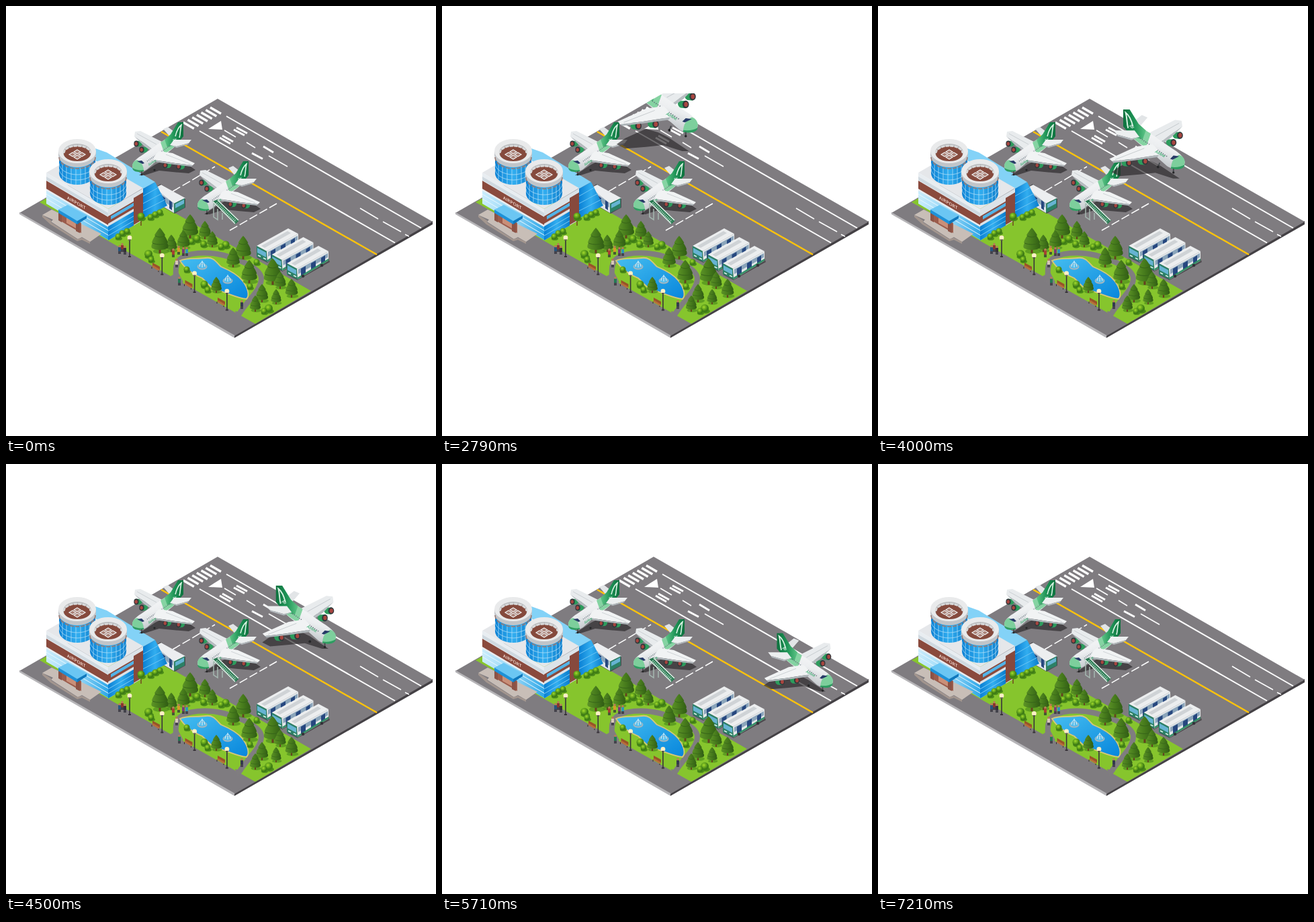
Recreate the animation shown at these times as an HTML page. Size 640 by 640 pixels, loop 9640 ms.

```html
<!DOCTYPE html>
<html lang="en">
<head>
<meta charset="utf-8">
<title>Isometric airport</title>
<style>
html, body { margin: 0; width: 100%; height: 100%; overflow: hidden; background: #fff; }
svg { display: block; width: 100%; height: 100%; }
.sign { font: 600 6.5px "Open Sans", Roboto, sans-serif; fill: #f3dcd3; }
.mark { fill: none; stroke: #fff; stroke-width: 2; }
.logo { font: italic 600 5px Lato, sans-serif; fill: #2fa866; }
.logo.light { fill: #fff; }
</style>
</head>
<body>
<svg viewBox="0 0 640 640">
<defs>
  <linearGradient id="water" x2="1" y2="1"><stop stop-color="#45bdf0"/><stop offset="1" stop-color="#0786dc"/></linearGradient>
  <linearGradient id="glass"><stop stop-color="#c9ecfc"/><stop offset=".55" stop-color="#8fd4f6"/><stop offset="1" stop-color="#2ea7e8"/></linearGradient>
  <linearGradient id="blue"><stop stop-color="#0a80d4"/><stop offset=".5" stop-color="#32aef0"/><stop offset="1" stop-color="#0a7ccc"/></linearGradient>
  <linearGradient id="hull" x2=".5" y2="1"><stop stop-color="#fff"/><stop offset=".55" stop-color="#eceef0"/><stop offset="1" stop-color="#b9bfc3"/></linearGradient>
  <linearGradient id="fin"><stop stop-color="#5fc487"/><stop offset=".5" stop-color="#1f9557"/><stop offset="1" stop-color="#0d713e"/></linearGradient>
  <linearGradient id="leaf"><stop stop-color="#5d9426"/><stop offset=".5" stop-color="#467a1c"/><stop offset="1" stop-color="#305c14"/></linearGradient>
  <radialGradient id="bushFill" cx=".4" cy=".35"><stop stop-color="#a5d92e"/><stop offset=".45" stop-color="#6fb01f"/><stop offset="1" stop-color="#3d7a15"/></radialGradient>
  <clipPath id="board"><path d="M315 138 635 321 340 491 20 308Z"/></clipPath>
  <clipPath id="airspace"><path d="M329 130H640V318L340 491 20 308Z"/></clipPath>

  <path id="shade" d="M10 12 34-4 46-10 60-14 84-3 94 4 84 9 60 7 40 5 18 12Z" fill="#2b292c" opacity=".68"/>

  <g id="engine">
    <path d="M-1-4.200 7-4C10-3 10 2 6 4L0 4.600Z" fill="#2d9c5d"/>
    <ellipse rx="3.700" ry="4.400" fill="#30383c"/>
    <ellipse cx="-.3" rx="2.200" ry="2.800" fill="#a8453f"/>
  </g>
  <g id="plane">
    <path d="M46-57 53-60 66-50 58-43Z" fill="#e2e5e7"/>
    <use href="#engine" x="6" y="-35"/><use href="#engine" x="14" y="-26"/>
    <path d="M3-46 4-53 12-54 48-36 32-25 19-35Z" fill="#e8ebed"/>
    <path d="M3-46 19-35 32-25 30-23 17-32Z" fill="#b7bdc1"/>
    <path d="M7-50 36-34" stroke="#c3c8cc" fill="none" stroke-width=".8"/>
    <path d="M0-2C1-9 8-14 16-19L48-41 58-44 68-36C60-26 50-20 40-13L22 3C14 9 0 7 0-2Z" fill="url(#hull)"/>
    <path d="M42-37 50-42 60-44 68-36C60-27 54-24 48-20Z" fill="#85d3a2"/>
    <path d="M48-41 57-49 68-67H76L76-46 66-34 52-30Z" fill="url(#fin)"/>
    <path d="M64-46C66-54 69-60 73-63 71-56 72-51 70-44" stroke="#d9f3e3" stroke-width="1.600" fill="none"/>
    <path d="M62-41 88-41 84-36 66-31 56-33Z" fill="#eceff0"/>
    <path d="M56-33 66-31 84-36 83-34 66-29Z" fill="#b3b9bd"/>
    <path d="M0-3C1-8 4-10 7-11 13-8 17-3 17 6 9 8 0 6 0-3Z" fill="#7dcf9c"/>
    <path d="M0 1C5 4 11 5 17 4V6C9 8 1 7 0 1Z" fill="#2f9c61"/>
    <path d="M7-9 14-10 18-6 15-5Z" fill="#263a67"/>
    <path d="M22-9 56-32" stroke="#5d6874" stroke-width="1.300" stroke-dasharray="1 1.600" fill="none"/>
    <use href="#engine" x="49" y="-3"/><use href="#engine" x="69" y="-1"/>
    <path d="M40-24 60-21 93-6 90-3 64-6 32-11C32-17 36-21 40-24Z" fill="#f1f3f4"/>
    <path d="M32-11 64-6 90-3 88-1 62-4 34-8Z" fill="#afb6ba"/>
    <path d="M50-19 86-5" stroke="#c6cbce" stroke-width=".8" fill="none"/>
    <path d="M14 6V11M31-1 33 4" stroke="#45494d" stroke-width="1.600"/>
    <circle cx="14" cy="11" r="1.400" fill="#252527"/><circle cx="33" cy="4" r="1.600" fill="#252527"/>
  </g>

  <g id="bus">
    <path d="M0 43 16 51 64 24 60 15Z" fill="#4d4a4e"/>
    <path d="M0 26 47 0 62 8 15 34Z" fill="#eceeef"/>
    <path d="M7 26 46 4 51 7 12 29Z" fill="#cfd3d6"/>
    <path d="M0 26 15 34 16 50 0 42Z" fill="#2c8065"/>
    <path d="M1 29 14 36V43L1 36Z" fill="#66b3d2"/>
    <path d="M2 40 6 42M10 44 14 46" stroke="#d9f1e4" stroke-width="1.500"/>
    <path d="M15 34 62 8V22L16 50Z" fill="#e4e8ea"/>
    <path d="M17 35 61 11V17L17 42Z" fill="#8ba5bb"/>
    <path d="M21 34 28 30V41L21 45ZM36 26 43 22V33L36 37ZM51 18 57 14V25L51 28Z" fill="#26477f"/>
    <path d="M16 47 62 19V22L16 50Z" fill="#349067"/>
    <circle cx="24" cy="45" r="2.300" fill="#343238"/><circle cx="52" cy="29" r="2.300" fill="#343238"/>
  </g>

  <g id="tower">
    <path d="M-27 6V33A27 17 0 0 0 27 33V6Z" fill="url(#blue)"/>
    <g fill="none" stroke="#bfe6fa" stroke-width=".7">
      <path d="M-27 18A27 17 0 0 0 27 18M-27 26A27 17 0 0 0 27 26"/>
      <path d="M-22 18V42M-16 22V46M-9 24V49M-2 25V50M5 25V50M12 23V48M18 21V45M23 17V41"/>
    </g>
    <path d="M-28 0V6A28 18 0 0 0 28 6V0Z" fill="#c1c5c9"/>
    <path d="M-27 9A27 17 0 0 0 27 9" fill="none" stroke="#9a7a73" stroke-width="1.600" stroke-dasharray="6 2"/>
    <ellipse rx="28" ry="18" fill="#e9eaeb"/>
    <ellipse cy="2" rx="21" ry="13" fill="#b9bbbd"/>
    <ellipse cy="4" rx="20" ry="11" fill="#854a3d"/>
    <path d="M-20 3A20 11 0 0 1 20 3" fill="none" stroke="#d9dadb" stroke-width="3" stroke-dasharray="5 1.500"/>
    <path d="M0-2 5 1 0 4-5 1ZM0 6 5 9 0 12-5 9ZM-7 2-2 5-7 8-12 5ZM7 2 12 5 7 8 2 5Z" fill="#a98177" stroke="#eee" stroke-width="1.200"/>
  </g>

  <g id="tree">
    <ellipse cx="2" cy="-3" rx="12" ry="4" fill="#4e8e1d" opacity=".7"/>
    <path d="M-1.500-9H1.500V0H-1.500Z" fill="#65421f"/>
    <path d="M0-38C4-34 6-30 8-27L7-26C9-23 11-20 12-16L11-15C13-12 13-9 12-8 8-4-8-4-12-8-13-9-13-12-11-15L-12-16C-11-20-9-23-7-26L-8-27C-6-30-4-34 0-38Z" fill="url(#leaf)"/>
    <path d="M-7-26Q0-22 7-26M-11-15Q0-11 11-15" fill="none" stroke="#37641a" stroke-width="1"/>
  </g>
  <g id="bush"><ellipse cx=".2" cy=".7" rx="1.100" ry=".6" fill="#4b8a19"/><circle r="1" fill="url(#bushFill)"/></g>
  <g id="lamp">
    <path d="M0 2V28" stroke="#38333a" stroke-width="1.600"/><path d="M-2 28H2" stroke="#38333a" stroke-width="2"/>
    <circle r="3.400" fill="#fff0c6"/><path d="M-2 3H2" stroke="#4a4248" stroke-width="1.200"/>
  </g>
  <g id="bench">
    <path d="M-4-5 7 1V6L-4 0Z" fill="#985328"/><path d="M-5 1-3-1 7 5 5 7Z" fill="#b86d3a"/>
    <path d="M-5 1V4M5 7V9" stroke="#3d302a"/>
  </g>
  <g id="fountain">
    <ellipse cy="2" rx="7.500" ry="4.500" fill="#a8b6bd"/><ellipse cy="1.500" rx="6" ry="3.200" fill="#55bdec"/>
    <path d="M-4 2Q-3-5 0-5 3-5 4 2M0-7V3" fill="none" stroke="#e3f5fd"/>
  </g>
</defs>

<path d="M20 307 340 490V494L20 310Z" fill="#b6b5b8"/>
<path d="M340 490 635 320V325L340 494Z" fill="#444145"/>
<path d="M315 138 635 321 340 491 20 308Z" fill="#7f7c80"/>
<path d="M20 308 340 491" stroke="#b6b5b8" stroke-width="2"/>

<g class="mark">
  <path d="M328 164 618 330.500M288 186 579 352.500"/>
  <path d="M325 185 342 195M358 203 371 211M391 223 419 239M527 301 554 317M561 321 588 336M594 340 600 343" stroke-width="1.600"/>
  <path d="M339 184 355 192.500M343 181 359 189.500M318 196 334 205M322 193 338 202M366 219 382 227.500M383 209 398 218" stroke-width="3"/>
  <path d="M248 276 311 239M333 334 403 294" stroke-width="1.500" stroke-dasharray="13 4"/>
  <g id="threshold" stroke-width="3.500"/>
</g>
<path d="M301 183 320 171 322 184Z" fill="#fff"/>
<path d="M231 187 552 370" stroke="#fdc30b" stroke-width="2.400"/>

<path d="M50 292 64 284 232 297 454 424 371 473Z" fill="#86c52d"/>
<path d="M250 411C256 402 249 390 257 379 268 366 300 365 324 371 350 378 380 391 380 406 379 424 360 437 346 460" fill="none" stroke="#807d80" stroke-width="8"/>
<path d="M245 402 256 396 264 411 254 415ZM341 454 353 457 344 464Z" fill="#807d80"/>
<path d="M259 379C270 374 284 377 297 375 310 373 314 383 320 388 332 393 345 400 352 409 360 419 363 431 358 436 345 435 332 428 318 424 305 421 300 412 292 405 280 400 267 392 259 379Z" fill="url(#water)" stroke="#d7c878" stroke-width="1.800"/>
<use href="#fountain" x="292" y="386"/><use href="#fountain" x="330" y="407"/>

<!-- shuttle behind the terminal -->
<g transform="translate(-1 1)">
  <path d="M222 270 231 264 268 286V299L252 308 222 291Z" fill="#4b494d"/>
  <path d="M222 270 232 265 268 285 251 293Z" fill="#eceef0"/>
  <path d="M222 270 251 293V307L222 290Z" fill="#dfe5ea"/>
  <path d="M226 275 250 292V299L226 284Z" fill="#8ba5bb"/>
  <path d="M234 282 238 285V296L234 294ZM244 288 248 291V303L244 300Z" fill="#27477e"/>
  <path d="M251 293 267 285V299L251 307Z" fill="#2c8065"/><path d="M253 294 266 287V293L253 300Z" fill="#66b3d2"/>
</g>

<!-- terminal -->
<path d="M133 212 150 218 222 262 204 272 114 219Z" fill="#83d2f7"/>
<path d="M204 272 222 262 240 297 204 316Z" fill="url(#blue)"/>
<path d="M204 283 227 270M204 294 232 279M204 305 237 288" stroke="#6cc4f3"/>
<path d="M60 248 112 218 204 271 152 302Z" fill="#e5e7ea"/>
<g transform="matrix(1 .587 0 1 60 248)">
  <path d="M0 0H92V46H0Z" fill="#e8edf1"/><path d="M0 6H92V11H0Z" fill="#cfd9e0"/>
  <path d="M0 12H92V24H0Z" fill="#8a4a3d"/>
  <path d="M0 27H92V46H0Z" fill="url(#glass)"/>
  <path d="M0 32H92M0 39H92" stroke="#e9f7fe" stroke-width="1.200"/>
  <text class="sign" x="31" y="21">AIRPORT</text>
</g>
<g transform="matrix(1 -.585 0 1 152 302)">
  <path d="M0 0H52V47H0Z" fill="#dce3e8"/>
  <path d="M0 11H38V22H0Z" fill="#8a4a3d"/><path d="M4 13H38V18H4Z" fill="#52b4e8"/>
  <path d="M0 26H38V47H0Z" fill="url(#blue)"/><path d="M0 33H38M0 40H38" stroke="#7bcaf4"/>
  <path d="M38 6H52V46H38Z" fill="#87493d"/>
</g>
<path d="M54 311 68 303 142 339 125 351 113 344 107 347 67 321 70 318Z" fill="#c8beb7"/>
<path d="M54 311 67 319 67 322 106 347 113 345 125 351V354L113 348 106 350 66 325 54 314Z" fill="#a3968f"/>
<path d="M83 307 112 323V338L83 321Z" fill="#9b5c4c"/><path d="M90 313 106 322V332L90 323Z" fill="#c98f78"/>
<path d="M78 306H83V322L78 319ZM104 320H110V338L104 335Z" fill="#8b5245"/>
<path d="M78 303 92 296 120 312 106 321Z" fill="#6bc6f3"/><path d="M78 303 106 320V325L78 308Z" fill="#1d91d8"/><path d="M106 320 120 312V316L106 325Z" fill="#0f78bd"/>
<use href="#tower" x="106" y="216"/><use href="#tower" x="152" y="246"/>

<g id="parked"></g>
<!-- boarding stairs -->
<path d="M307 291 315 288 347 319 341 325Z" fill="#26784f"/>
<path d="M308 291 341 324M315 289 346 319" stroke="#e4ece8" stroke-width="1.600"/>
<path d="M313 293 342 321" stroke="#b9d8c8" stroke-width="4" stroke-dasharray="1 1.500"/>
<path d="M309 294V314L315 318V302M322 308V318" stroke="#a5b8b0" stroke-width="1.500" fill="none"/>

<use href="#bus" x="373" y="331"/><use href="#bus" x="395.500" y="344"/><use href="#bus" x="418" y="357"/>
<g id="garden"></g>

<g clip-path="url(#board)"><use id="flyShade" href="#shade"/></g>
<g clip-path="url(#airspace)"><g id="flyer">
  <use href="#plane" transform="scale(-1 1)"/>
  <text class="logo" transform="translate(-37 -14) rotate(29)">Airline</text>
  <text class="logo light" transform="translate(-69 -46) rotate(32)">Air</text>
</g></g>
</svg>

<script>
const byId = id => document.getElementById(id);
const move = (x, y) => `translate(${x} ${y})`;

byId('threshold').innerHTML = Array.from({length: 7}, (_, i) =>
  `<path d="M${304 - 6.7 * i} ${151 + 3.7 * i}l16 9.300"/>`).join('');

byId('parked').innerHTML = [[188, 240], [285, 298]].map(([x, y]) =>
  `<g transform="${move(x, y)}"><use href="#shade"/><use href="#plane"/>
   <text class="logo" transform="translate(25 -2) rotate(-33)">Airline</text>
   <text class="logo light" transform="translate(61 -38) rotate(-28)">Air</text></g>`).join('');

// Garden pieces: base x, base y, size
const trees = [[229, 368, 1], [246, 366, .68], [264, 362, .75], [274, 346, .95], [296, 347, .72], [307, 359, .63],
  [353, 377, .92], [338, 389, .78], [362, 413, .93], [397, 415, 1.04], [408, 421, .68], [381, 441, .72],
  [402, 444, .6], [425, 434, .74], [371, 455, .64], [313, 427, .63]];
const bushes = [[167, 343, 4.5], [173, 338, 4.5], [180, 335, 4.5], [201, 313, 5.5], [215, 314, 4.5], [222, 310, 4.5],
  [229, 307, 4.5], [212, 369, 6], [216, 377, 4.5], [276, 350, 4.5], [284, 346, 5.5], [294, 354, 5], [320, 358, 4.5],
  [327, 355, 5.5], [269, 392, 4.5], [295, 414, 5.5], [300, 422, 4.5], [363, 417, 4.5], [373, 381, 4.5],
  [384, 454, 4.5], [391, 450, 6]];
const people = [[169, 361, '#28557d'], [173, 358, '#8b3430'], [177, 362, '#37303b'], [254, 381, '#d7c7b8'], [258, 408, '#257a55'],
  [249, 366, '#a64031'], [257, 362, '#d39b28'], [264, 364, '#7b3b75'], [269, 364, '#3094b5'], [351, 443, '#333a4d']];

const sprites = [
  ...trees.map(([x, y, s]) => ({y, svg: `<use href="#tree" transform="${move(x, y)} scale(${s})"/>`})),
  ...bushes.map(([x, y, r]) => ({y: y + r, svg: `<use href="#bush" transform="${move(x, y)} scale(${r})"/>`})),
  ...people.map(([x, y, color]) => ({y: y + 6, svg: `<g transform="${move(x, y)}"><path d="M-1 2V8M1 2V8" stroke="#2b2b36" stroke-width="1.400"/>
    <path d="M-2-2H2V4H-2Z" fill="${color}"/><circle cy="-3.500" r="1.700" fill="#b77b58"/></g>`})),
  ...[0, 1, 2, 3].map(i => ({y: 373 + 26.5 * i, svg: `<use href="#lamp" x="${184 + 48.3 * i}" y="${345 + 26.5 * i}"/>`})),
  ...[0, 1, 2].map(i => ({y: 392 + 26 * i, svg: `<use href="#bench" x="${222 + 48.5 * i}" y="${387 + 26 * i}"/>`})),
];
byId('garden').innerHTML = '<path d="M201 317V327" stroke="#70471f" stroke-width="1.500"/>' +
  sprites.sort((a, b) => a.y - b.y).map(s => s.svg).join('');

const LOOP = 9640, STEP = LOOP / 135;
const mix = (a, b, k) => a + (b - a) * Math.min(1, Math.max(0, k));

function draw() {
  const time = Math.floor((performance.now() % LOOP + 3) / STEP) * STEP;
  const airborne = time >= 920 && time < 7205;
  const s = (time - 1860) / 1000;
  const x = 330 + 51.5 * s + 3.6 * s * s;
  const y = 143 + 37.3 * s + 2.6 * s * s;
  const size = 1.34 - .063 * s;

  // The shadow closes in on the aircraft until touchdown.
  const late = s > 1.64, k = late ? (s - 1.64) / 1.1 : s / 1.64;
  const driftX = late ? mix(8, 0, k) : mix(-11, 8, k);
  const driftY = late ? mix(14, 0, k) : mix(30, 14, k);

  byId('flyer').setAttribute('transform', `${move(x, y)} scale(${size})`);
  byId('flyShade').setAttribute('transform', `${move(x + driftX, y + driftY)} scale(${-size} ${size})`);
  for (const id of ['flyer', 'flyShade']) byId(id).style.display = airborne ? '' : 'none';
  requestAnimationFrame(draw);
}
draw();
</script>
</body>
</html>
```
